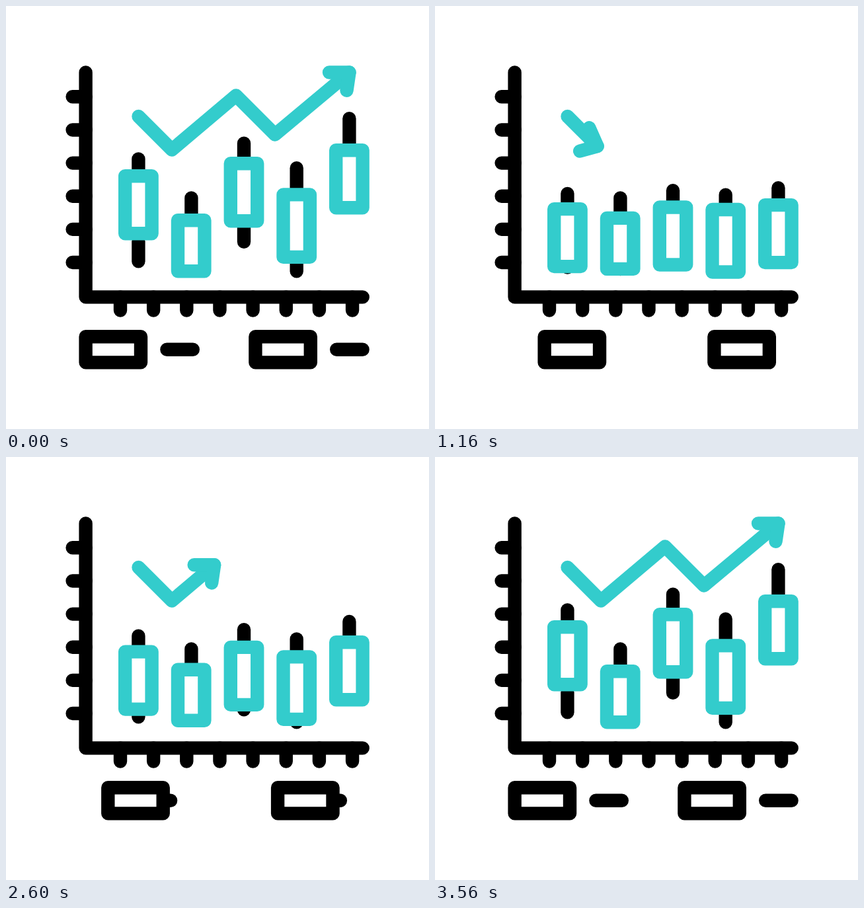
These frames come from a looping animation (640 px wide and 640 px high, 3600 ms). An HTML page:

```html
<!DOCTYPE html>
<html lang="en">
<head>
<meta charset="utf-8">
<title>Candlestick chart</title>
<style>
  /* 0 = full chart, 1 = collapsed */
  @property --p { syntax: "<number>"; inherits: true; initial-value: 0; }

  html, body { margin: 0; width: 100%; height: 100%; overflow: hidden; background: #fff; }
  svg {
    display: block; width: 100vw; height: 100vh;
    fill: none; stroke: #000; stroke-width: 20.4;
    stroke-linecap: round; stroke-linejoin: round;
    animation: collapse 3600ms infinite cubic-bezier(.713, 0, .287, 1);
  }
  @keyframes collapse {
    0% { --p: 0; }
    49.7% { --p: 1; }
    98.9%, 100% { --p: 0; }
  }

  rect { fill: #fff; }
  .teal, .candle rect { stroke: #3cc; }
  .x { transform: translateX(calc(var(--p) * var(--d) * 1px)); }
  .y { transform: translateY(calc(var(--p) * var(--d) * 1px)); }

  .trend { stroke-dasharray: 1 2; stroke-dashoffset: calc(var(--p) * 1px); }
  .tip {
    offset-path: path("M200.5 167L251 217.5L348 135.5L407 194.5L519.5 100.5");
    offset-distance: calc((1 - var(--p)) * 100%);
    offset-rotate: 0deg;
  }
  /* quarter turn at each bend of the trend line */
  .head {
    --a: clamp(0, (var(--p) - .3) / .08, 1);
    --b: clamp(0, (var(--p) - .465) / .09, 1);
    --c: clamp(0, (var(--p) - .785) / .09, 1);
    transform: rotate(calc((var(--a) - var(--b) + var(--c)) * 90deg));
  }
</style>
</head>
<body>
<svg viewBox="0 0 640 640">
  <path d="M120.6 100.4V440.4H539.7"/>
  <path id="ticks"/>

  <g class="candle" transform="translate(200.4)">
    <path class="y" style="--d:61.5" d="M0 231.5v40"/>
    <path class="y" style="--d:11" d="M0 386.3v-30"/>
    <rect class="y" style="--d:58.7" x="-20.2" y="257.2" width="40.4" height="87"/>
  </g>
  <g class="candle" transform="translate(280.2)">
    <path d="M.2 290.4V398"/>
    <rect class="y" style="--d:-3.9" x="-20.2" y="324.2" width="40.4" height="77"/>
  </g>
  <g class="candle" transform="translate(360)">
    <path class="y" style="--d:84" d="M0 207.7v40"/>
    <path class="y" style="--d:40" d="M0 356.7v-30"/>
    <rect class="y" style="--d:77.8" x="-20.2" y="238.3" width="40.4" height="87"/>
  </g>
  <g class="candle" transform="translate(439.7)">
    <path class="y" style="--d:47.5" d="M0 245.3v50"/>
    <path d="M0 401.2v-30"/>
    <rect class="y" style="--d:26.6" x="-20.2" y="285.4" width="40.4" height="94.5"/>
  </g>
  <g class="candle" transform="translate(519.4)">
    <path class="y" style="--d:123.5" d="M0 170.2v50"/>
    <rect class="y" style="--d:97.4" x="-20.2" y="218.2" width="40.4" height="87"/>
  </g>

  <g class="teal">
    <path class="trend" pathLength="1" d="M200.5 167L251 217.5L348 135.5L407 194.5L519.5 100.5"/>
    <g class="tip"><path class="head" d="M-30.5 0H0L-4 27.2"/></g>
  </g>

  <g id="legend">
    <path class="x" style="--d:-52.9" d="M243.4 519.8h39.4"/>
    <rect class="x" style="--d:52.9" x="120.6" y="500.2" width="83.4" height="39.2"/>
  </g>
  <use href="#legend" x="256.8"/>
</svg>
<script>
  const step = 50.15;
  let d = "";
  for (let i = 0; i < 6; i++) d += `M100.6 ${137.3 + i * step}H120.6`;
  for (let i = 0; i < 8; i++) d += `M${173 + i * step} 440.4V460.6`;
  document.getElementById("ticks").setAttribute("d", d);
</script>
</body>
</html>
```
